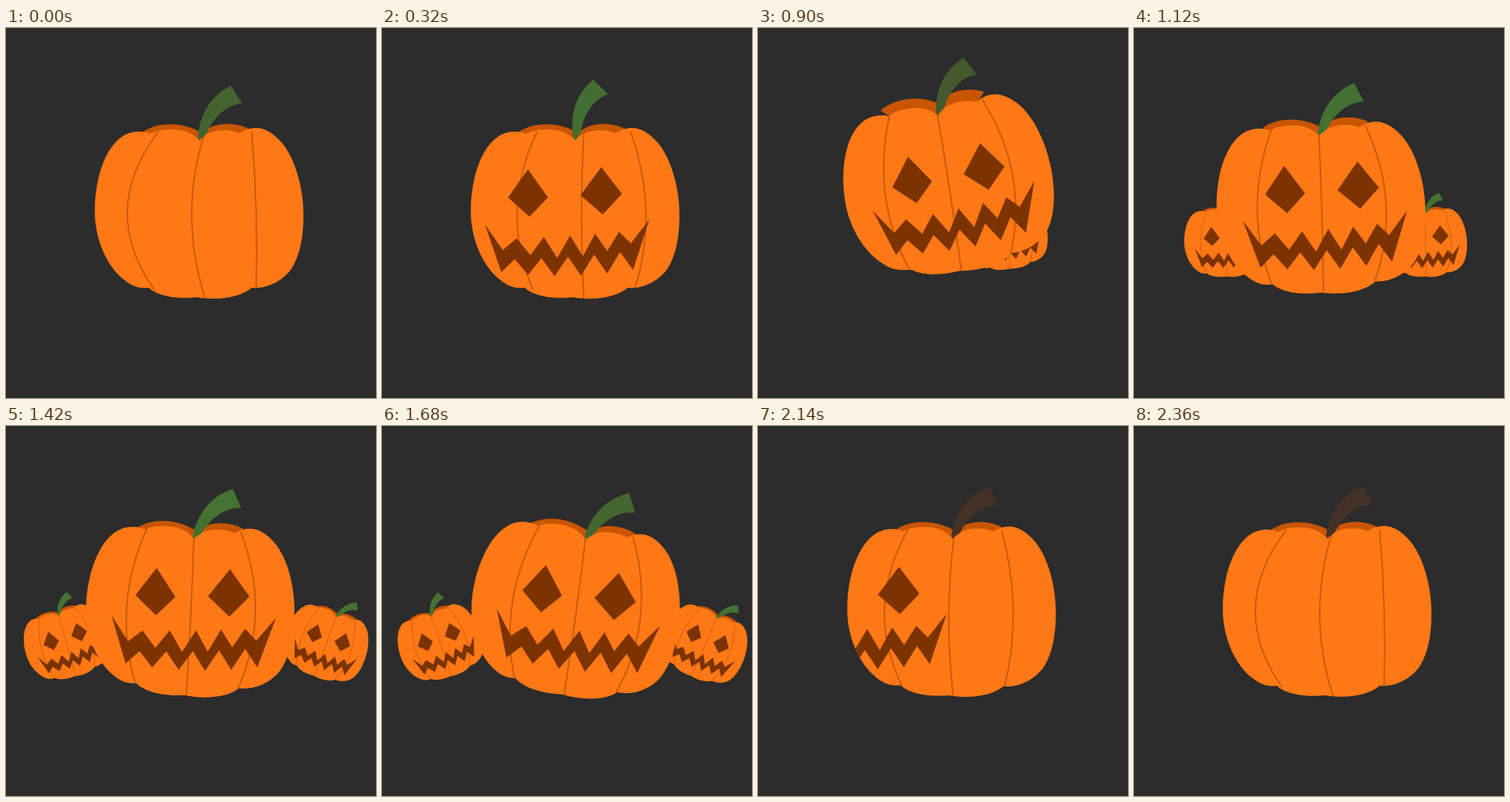
Animation of 500x500 px, one loop 2.72 s. Source, as an HTML page:

```html
<!DOCTYPE html>
<html lang="en">
<head>
<meta charset="utf-8">
<title>Pumpkins</title>
<style>
  html, body { margin: 0; width: 100%; height: 100%; overflow: hidden; background: #2c2c2c; }
  svg { display: block; width: 100vw; height: 100vh; }
</style>
</head>
<body>
<svg id="stage" viewBox="0 0 500 500">
  <defs>
    <path id="body" d="M261 152 C254 143 240 136 222 137 C208 137 200 140 195 143 C188 139 170 138 158 146 C133 162 120 205 120 248 C120 290 140 325 158 339 C172 351 182 352 193 351 C203 361 228 367 258 364 C290 369 318 363 332 351 C352 353 374 342 386 325 C398 306 402 280 402 253 C402 215 390 172 369 151 C352 134 335 130 316 142 C303 137 285 136 268 145 Z"/>
    <path id="back" d="M186 140 C205 127 238 126 265 142 C280 127 308 126 328 136 L318 148 L262 158 L195 148 Z"/>
    <path id="stem" d="M259.5 148 C261 120 275 92 304 78 L319 102 C296 104 279 123 271 143 L261 152 Z"/>
    <path id="eyes" d="M237 191 L264 229 L239 255 L210 229 Z M336 188 L364 224 L338 252 L308 226 Z"/>
    <clipPath id="skin"><use href="#body"/></clipPath>
  </defs>
</svg>
<script>
const LOOP = 2720;
const MID = 261;
const GREEN = [67, 114, 50], BROWN = [70, 49, 38];
const stage = document.getElementById('stage');

// Progress from 0 to 1 between two times
const span = (t, a, b) => Math.min(1, Math.max(0, (t - a) / (b - a)));
const smooth = (t, a, b) => { const u = span(t, a, b); return u * u * (3 - 2 * u); };
const out = (t, a, b, power = 2) => 1 - (1 - span(t, a, b)) ** power;
const hop = t => Math.max(0, Math.sin(Math.PI * span(t, 620, 1180))) ** 1.5;

function add(parent, tag, attrs = {}) {
  const el = document.createElementNS('http://www.w3.org/2000/svg', tag);
  for (const k in attrs) el.setAttribute(k, attrs[k]);
  return parent.appendChild(el);
}

// Two zigzag edges of teeth between the corners of the grin
function mouthPoints() {
  const upper = [], lower = [];
  for (let i = 0; i <= 10; i++) {
    const bow = Math.sin(Math.PI * i / 10), even = i % 2 === 0;
    upper.push([203 + 17.3 * i + 4.5 * bow, even ? 300 - 0.9 * i + 15 * bow : 285 - 1.1 * i + bow]);
    lower.push([201 + 17.8 * i + bow, even ? 330 - 0.3 * i + 7 * bow : 313 - 1.2 * i + 2 * bow]);
  }
  return [[179, 266], ...upper, [401, 259], ...lower.reverse()].join(' ');
}

// Three ribs bulging between shared ends; the two shifts turn the pumpkin
function ribPath(ends, belly) {
  return [-1, 0, 1].map(k => {
    const top = MID + 63 * k + ends, bottom = MID + 69 * k + ends, mid = MID + 87 * k + belly;
    const y0 = 140, y1 = k ? 353 : 365;
    return `M${top} ${y0} Q${2 * mid - (top + bottom) / 2} ${(y0 + y1) / 2} ${bottom} ${y1}`;
  }).join(' ');
}

function makePumpkin() {
  const root = add(stage, 'g');
  const back = add(root, 'use', { href: '#back', fill: '#c85500' });
  add(root, 'use', { href: '#body', fill: '#fe7816' });
  const inside = add(root, 'g', { 'clip-path': 'url(#skin)' });
  const ribs = add(inside, 'path', { fill: 'none', stroke: '#c85a08', 'stroke-width': 2 });
  const eyes = add(inside, 'use', { href: '#eyes', fill: '#7c3300' });
  const mouth = add(inside, 'polygon', { points: mouthPoints(), fill: '#7c3300' });
  const stem = add(root, 'use', { href: '#stem' });
  return { root, back, ribs, eyes, mouth, stem };
}

function pose(p, place, look) {
  const brown = look.brown;
  const color = GREEN.map((g, i) => Math.round(g + (BROWN[i] - g) * brown));
  p.root.setAttribute('transform', place);
  p.back.setAttribute('transform', `translate(0 ${-look.lift})`);
  p.ribs.setAttribute('d', ribPath(look.ends, look.belly));
  p.eyes.setAttribute('transform', `translate(${look.face} ${look.eyes})`);
  p.mouth.setAttribute('transform', `translate(${look.face} ${look.mouth})`);
  p.stem.setAttribute('transform', `rotate(${look.stem} ${MID} 151)`);
  p.stem.setAttribute('fill', `rgb(${color})`);
}

const small = [
  { side: -1, start: 830, end: 1530, reach: 169, lean: 20 },
  { side: 1, start: 720, end: 1600, reach: 159, lean: 25 }
].map(s => ({ ...s, pumpkin: makePumpkin() }));
const big = makePumpkin();
const smallLook = { lift: 0, ends: 0, belly: 1, face: -24, eyes: 4, mouth: 0, stem: 5, brown: 0 };

function drawSmall(s, t) {
  const home = smooth(t, 1700, 2120);
  const x = MID + s.side * s.reach * out(t, s.start, s.end, 3) * (1 - home);
  const y = 333 - 13 * hop(t);
  const lean = smooth(t, 1080, 1560) * (1 - smooth(t, 1640, 1920));
  const angle = s.side * s.lean * lean - 8 * hop(t);
  pose(s.pumpkin, `translate(${x} ${y}) rotate(${angle}) scale(.4) translate(${-MID} -351)`, smallLook);
}

function drawBig(t) {
  const enter = smooth(t, 0, 480), settle = smooth(t, 560, 900), leave = smooth(t, 1960, 2360);
  const swing = smooth(t, 1420, 1900), upright = smooth(t, 1920, 2175), up = hop(t);
  const x = -12 * smooth(t, 610, 1420) + 23.5 * smooth(t, 1420, 1920) - 11.5 * upright;
  const angle = -8.8 * smooth(t, 600, 900) + 11.5 * Math.sin(span(t, 900, 1420) * Math.PI / 2)
    + 9 * swing - 11.7 * upright;
  pose(big, `translate(${x} ${-35 * up}) rotate(${angle} ${MID} 250)`, {
    lift: 6 * up,
    ends: 8 + 5 * enter - 13 * settle + 8 * leave,
    belly: -10 + 25 * enter - 14 * settle - 11 * leave,
    face: -310 * (1 - out(t, 0, 500)) - 24 * settle - 286 * leave,
    eyes: 10 * up * up + 3 * smooth(t, 1120, 1420),
    mouth: -5 * smooth(t, 900, 1400),
    stem: -21 * smooth(t, 0, 530) + 24 * settle + 2.4 * smooth(t, 900, 1120) - 1.4 * leave,
    brown: 0.22 * (1 - enter) + 0.37 * up * up + smooth(t, 1600, 1900) * (1 - 0.22 * (1 - enter))
  });
}

const start = performance.now();
function tick(now) {
  const t = Math.max(0, now - start) % LOOP;
  small.forEach(s => drawSmall(s, t));
  drawBig(t);
  requestAnimationFrame(tick);
}
tick(start);
</script>
</body>
</html>
```
